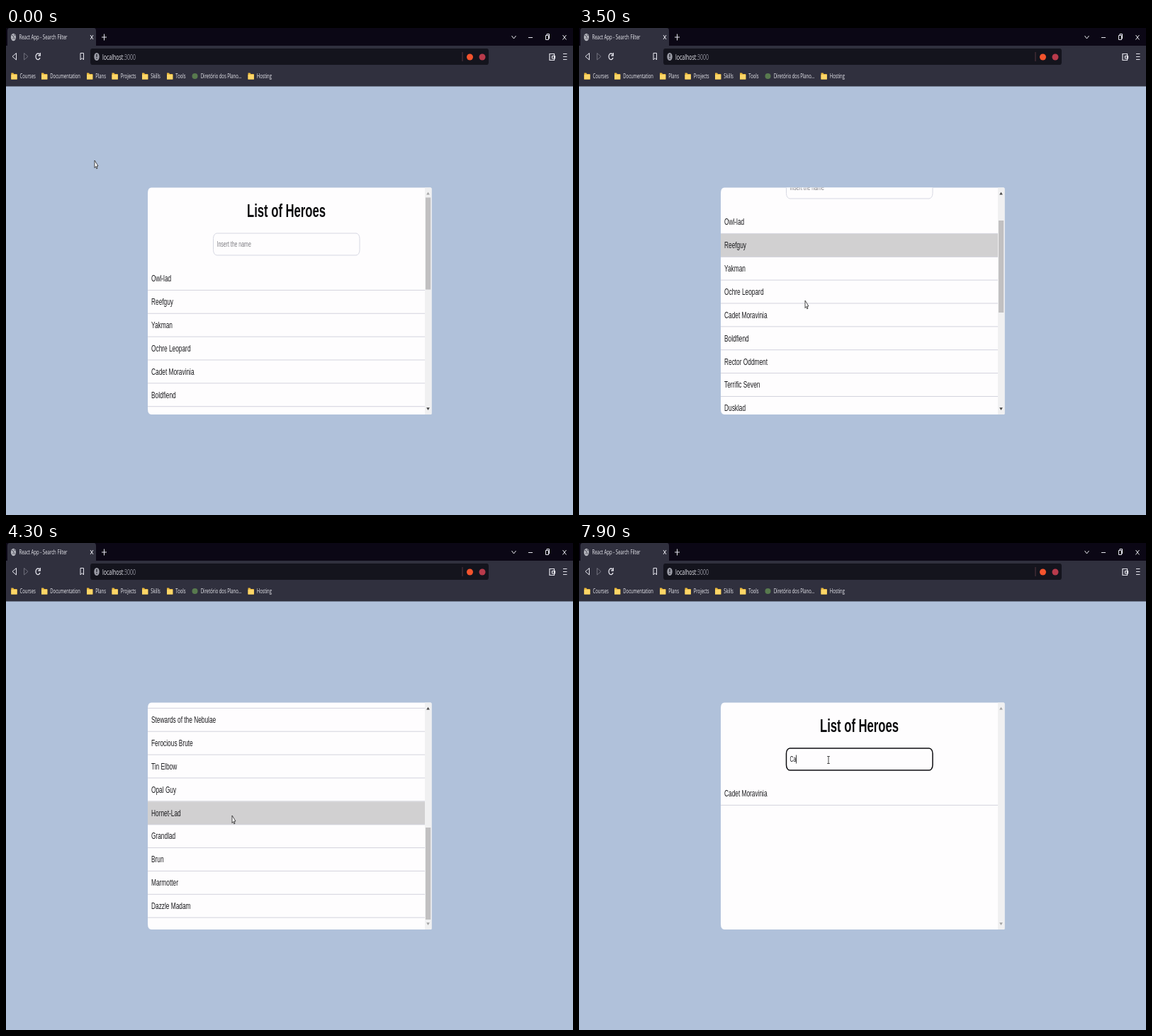
Write an HTML page that moves like this. It is 800x688 px and loops after 8 s.

```html
<!DOCTYPE html>
<html lang="en">
<head>
<meta charset="utf-8">
<title>Search Filter</title>
<style>
  html, body { margin: 0; width: 100%; height: 100%; overflow: hidden; background: #b0c1da; }
  svg { display: block; width: 800px; height: 688px; }
  .ui { font-family: "Open Sans", "Noto Sans", sans-serif; }
  .page { font-family: "Liberation Sans", Arial, sans-serif; }
  .line { fill: none; stroke: #e6e6ee; stroke-width: 1; }
</style>
</head>
<body>
<svg viewBox="0 0 800 688">
  <defs>
    <clipPath id="card"><path d="M205.2 225.5H599Q600.5 225.5 600.5 227V544.5Q600.5 546 599 546H205.2Q200 546 200 538V233.500Q200 225.5 205.2 225.5Z"/></clipPath>
  </defs>
  <rect width="800" height="688" fill="#b0c1da"/>

  <g id="chrome">
    <rect width="800" height="26" fill="#0b0715"/>
    <rect y="25" width="800" height="57.5" fill="#30303e"/>
    <path d="M2 26V4Q2 0 5 0H124Q127 0 127 4V26Z" fill="#30303e"/>
    <ellipse cx="10.500" cy="13" rx="3.6" ry="5.300" fill="#b4b5bd"/>
    <path d="M8 10l2.500 1.500 .5 2-1.500 2M11 9l2 2M11.500 15.500l1.500 -1" stroke="#454552" fill="none"/>
    <path class="line" d="M119 10l4 6m0 -6l-4 6M135 13h7m-3.500 -4.500v9M713.500 11l3 4 3 -4M737 13.500h6M785.500 10l5 6.500m0 -6.500l-5 6.500"/>
    <path class="line" d="M761.500 10.500h4v6h-4zM763 10v-1.500h3.500v6.500h-1"/>
    <path class="line" d="M14.500 35.500v9.500l-5.500 -4.700z"/>
    <path class="line" d="M25.500 35.500v9.500l5.500 -4.700z" style="stroke:#6e6e7b"/>
    <path class="line" d="M47.500 37.500A3.100 4.300 0 1 0 48 42M48.300 35v4h-3" style="stroke-width:1.300"/>
    <path class="line" d="M105 35.500h4.500v9.500l-2.250 -2.500 -2.250 2.500z"/>
    <rect x="119" y="29" width="562" height="23" rx="2.500" ry="4" fill="#14141d"/>
    <ellipse cx="128" cy="40.500" rx="3.700" ry="5.500" fill="#9b9ca6"/>
    <path d="M128 37v4m0 1.300v1.500" stroke="#14141d" stroke-width="1.200"/>
    <path d="M644 34v13" stroke="#553641"/>
    <circle cx="654.500" cy="41" r="4.500" fill="#f4532d"/>
    <circle cx="672" cy="41" r="4.500" fill="#b83a4b"/>
    <path class="line" d="M767 36.500h6.500v9h-6.500zM770.500 39.500h4v3.500h-4zM786 36.500h5.500m-5.500 4h5.500m-5.500 4h5.500" style="stroke-width:1.200"/>
  </g>

  <g clip-path="url(#card)">
    <rect x="200" y="225" width="401" height="322" fill="#fefdfe"/>
    <g id="content">
      <g id="title"></g>
      <rect id="field" x="292.500" y="290" width="206.500" height="31" rx="5" ry="7.500" fill="#fefdfe"/>
      <g id="value"></g>
      <rect id="caret" y="299.500" width=".8" height="12" fill="#111"/>
      <g id="rows"></g>
    </g>
    <rect x="591" y="225" width="10" height="322" fill="#f0f0f1"/>
    <rect id="thumb" x="592" width="7.200" height="130" fill="#c1c0c1"/>
    <path id="up" d="M593.200 235.500h4.600l-2.300 -3.700z"/>
    <path id="down" d="M593.200 536.300h4.600l-2.300 3.700z"/>
  </g>

  <path id="arrow" d="M0 0V10.500L1.600 8.600 2.800 11.800 4 11.200 2.900 8H5Z" fill="#fff" stroke="#222" stroke-width=".8"/>
  <path id="beam" d="M-1.800 -5H1.800M-1.800 5H1.800M0 -5V5" fill="none" stroke="#333" stroke-width=".9"/>
</svg>

<script>
const LOOP = 8000, STEP = 100;
// The screen is shown narrower than it is tall, so every label shares one scale.
const SX = 800 / 1536, SY = 688 / 864;
const ROW_TOP = 338, ROW_H = 32.87, MAX_SCROLL = 400;

const heroes = ["Owl-lad", "Reefguy", "Yakman", "Ochre Leopard", "Cadet Moravinia",
  "Boldfiend", "Rector Oddment", "Terrific Seven", "Dusklad", "Stewards of the Nebulae",
  "Ferocious Brute", "Tin Elbow", "Opal Guy", "Hornet-Lad", "Grandlad", "Brun",
  "Marmotter", "Dazzle Madam"];

// Keyframes: time, then values
const pointer = [
  [0, 125, 187], [300, 140, 203], [1300, 140, 203], [1400, 146, 194], [1600, 190, 173],
  [1700, 225, 192], [1900, 297, 266], [2000, 312, 286], [2200, 323, 307], [2300, 328, 306],
  [2600, 328, 306], [2700, 325, 332], [2800, 321, 362], [2900, 319, 385], [5100, 319, 385],
  [5200, 336, 300], [5300, 352, 256], [5400, 360, 275], [5500, 352, 315], [5600, 347, 334],
  [5800, 347, 334], [5900, 349, 326], [6000, 350, 316], [6200, 352, 306.5]
];
const scrolling = [[3400, 0], [3500, 80], [3800, 266.500], [4000, 360], [4200, MAX_SCROLL],
  [4600, MAX_SCROLL], [4700, 300], [4900, 60], [5000, 0]];
const hovering = [[0, -1], [2800, 0], [2900, 1], [4300, 13], [5000, -1]];
const typing = [[0, ""], [7200, "C"], [7600, "Ca"]];

const $ = id => document.getElementById(id);

function label(x, y, size, text, attrs = "") {
  return `<text transform="translate(${x} ${y}) scale(${SX} ${SY})" font-size="${size}" ${attrs}>${text}</text>`;
}

function held(keys, t) {
  return keys.filter(k => k[0] <= t).pop()[1];
}

function tween(keys, t) {
  const next = keys.findIndex(k => k[0] > t);
  if (next < 0) return keys[keys.length - 1].slice(1);
  if (next === 0) return keys[0].slice(1);
  const a = keys[next - 1], b = keys[next], p = (t - a[0]) / (b[0] - a[0]);
  return a.slice(1).map((v, i) => v + (b[i + 1] - v) * p);
}

function buildStatic() {
  const ui = 'class="ui" fill="#ececf2"';
  const folder = x => `<path d="M${x} 63.500h3l1 1.500h4.300v7.500h-8.300z" fill="#e9b93f"/>
    <path d="M${x} 66h8.300v6.500h-8.300z" fill="#fdd667"/>`;
  const marks = [[7.300, "Courses"], [50, "Documentation"], [114, "Plans"], [149.500, "Projects"],
    [192, "Skills"], [227, "Tools"], [262.500, "Diretório dos Plano..."], [341.500, "Hosting"]];
  let html = label(18.500, 16.300, 11.600, "React App - Search Filter", ui)
    + label(136, 44.700, 13.400, 'localhost<tspan fill="#92929d">:3000</tspan>', ui);
  for (const [x, name] of marks) {
    html += name.startsWith("Dir") ? `<circle cx="${x + 4}" cy="68" r="4" fill="#587a4e"/>` : folder(x);
    html += label(x + 12.300, 71.200, 11.300, name, ui);
  }
  $("chrome").insertAdjacentHTML("beforeend", html);
  $("title").innerHTML = label(395.500, 266.500, 32, "List of Heroes",
    'class="page" font-weight="bold" text-anchor="middle" fill="#0c0c0e"');
}

function row(name, i, hover) {
  const y = ROW_TOP + i * ROW_H;
  return `<rect x="200" y="${y}" width="391" height="${ROW_H}" fill="${i === hover ? "#d1d0d1" : "none"}"/>
    <rect x="200" y="${y + ROW_H - 1}" width="391" height="1" fill="#d3d3dd"/>`
    + label(205, y + 20.300, 16, name, 'class="page" fill="#1b1b1e"');
}

function draw(t) {
  const [x, y] = tween(pointer, t), [scroll] = tween(scrolling, t);
  const query = held(typing, t), hover = held(hovering, t), focused = t >= 6400;

  const shown = heroes.filter(h => h.toLowerCase().includes(query.toLowerCase()));
  $("rows").innerHTML = shown.map((h, i) => row(h, i, hover)).join("");
  $("content").setAttribute("transform", `translate(0 ${-scroll})`);

  $("field").setAttribute("stroke", focused ? "#0d0d10" : "#d6d7e2");
  $("field").setAttribute("stroke-width", focused ? 1.500 : 1);
  $("value").innerHTML = label(297.500, 309, 13.333, query || "Insert the name",
    `class="page" fill="${query ? "#1b1b1e" : "#7b7b80"}"`);
  const typed = query ? $("value").firstChild.getComputedTextLength() * SX : 0;
  $("caret").setAttribute("x", 297.300 + typed);
  $("caret").style.display = focused && (t < 6900 || t >= 7200) ? "" : "none";

  const long = shown.length > 5;
  $("thumb").style.display = long ? "" : "none";
  $("thumb").setAttribute("y", 239.500 + scroll / MAX_SCROLL * 162.500);
  $("up").setAttribute("fill", long && scroll > 0 ? "#444" : "#a3a3a3");
  $("down").setAttribute("fill", long && scroll < MAX_SCROLL ? "#444" : "#a3a3a3");

  const inField = scroll === 0 && x > 292 && x < 499 && y > 290 && y < 321;
  $("arrow").style.display = inField ? "none" : "";
  $("beam").style.display = inField ? "" : "none";
  $(inField ? "beam" : "arrow").setAttribute("transform", `translate(${x} ${y})`);
}

buildStatic();
const start = performance.now();
let last = -1;
function tick() {
  const t = Math.floor((performance.now() - start) % LOOP / STEP) * STEP;
  if (t !== last) draw(last = t);
  requestAnimationFrame(tick);
}
tick();
</script>
</body>
</html>
```
